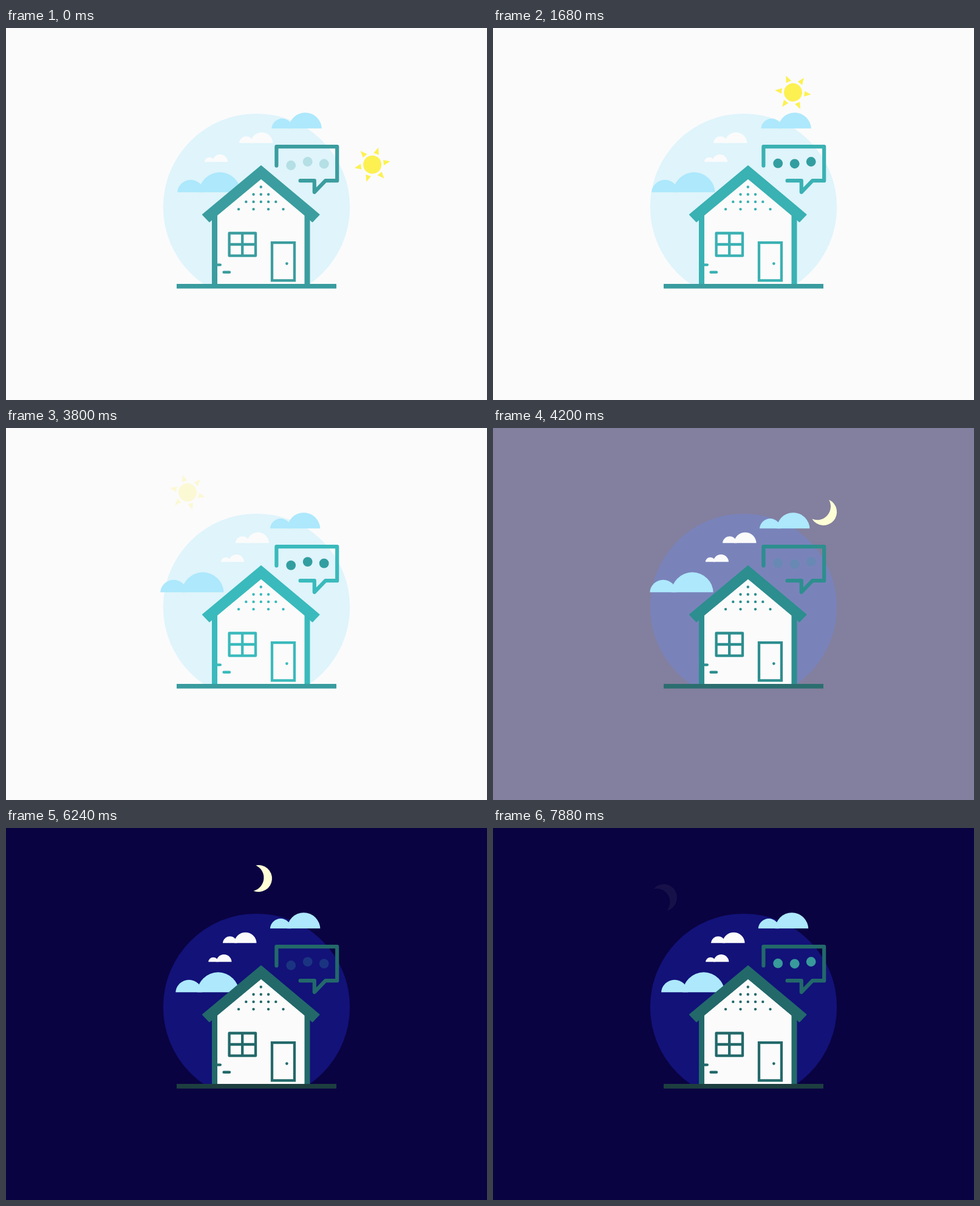
These frames come from a looping animation (792 by 612 pixels, 7920 ms). An HTML page:

```html
<!DOCTYPE html>
<html lang="en">
<head>
<meta charset="utf-8">
<title>House by day and night</title>
<style>
  html, body { margin: 0; width: 100%; height: 100%; overflow: hidden; background: #fbfbfb; }
  svg { display: block; width: 792px; height: 612px; }
  .line { fill: none; stroke: var(--house); stroke-linejoin: round; stroke-linecap: round; }
  .fill { fill: var(--house); }
</style>
</head>
<body>
<svg id="stage" viewBox="0 0 792 612">
  <defs>
    <clipPath id="aboveGround"><rect width="792" height="421"/></clipPath>
    <clipPath id="flatBase"><rect x="-5" y="-40" width="120" height="40"/></clipPath>
    <g id="cloud" clip-path="url(#flatBase)">
      <circle cx="22" cy="1.5" r="22.05"/>
      <circle cx="70" cy="1.5" r="34.5"/>
    </g>
  </defs>

  <rect id="sky" width="792" height="612"/>
  <circle id="disc" cx="412.5" cy="294.6" r="153.7" clip-path="url(#aboveGround)"/>
  <g id="sun" fill="#fcf151"><circle r="15"/></g>
  <path id="moon" fill="#ffffd6" d="M-6.5-21A22 22 0 1 1-6.5 21A22.2 22.2 0 0 0-6.5-21Z"/>
  <g id="clouds"></g>

  <path class="fill" d="M339 300H500.5V421H339Z"/>
  <path fill="#fbfbfb" d="M348 421V308L420 248L491.5 308V421Z"/>
  <path class="fill" stroke="var(--house)" stroke-width="2" stroke-linejoin="round"
        d="M420 227L515.5 307L504.5 318.5L492.5 308.1L420 247.4L347 308.1L335 318.5L324 307Z"/>
  <g id="gable" class="fill"></g>
  <path class="line" stroke-width="4.3" d="M367.6 337.5H411V374.7H367.6ZM389.2 337.5V374.7M367.6 356H411"/>
  <path class="line" stroke-width="4.3" style="stroke-linejoin:miter" d="M438 353.2H475V415.3H438Z"/>
  <circle class="fill" cx="462.4" cy="387.6" r="2.3"/>
  <path class="line" stroke-width="4.4" d="M346 389.6H352.8M358.6 401.8H368"/>
  <rect id="ground" x="281" y="421" width="263" height="7.6"/>
  <path class="line" stroke-width="6.2" d="M445.4 226.4V195.2H545.2V251.2H526L507.8 270V251.2H484.6"/>
  <g id="typing"></g>
</svg>

<script>
const LOOP = 7920, HALF = LOOP / 2, FADE = 720;
const PIVOT = [396.5, 305];
const DRIFT = .0103; // cloud speed, px per ms
const $ = id => document.getElementById(id);

function add(parent, tag, attrs) {
  const el = document.createElementNS('http://www.w3.org/2000/svg', tag);
  for (const k in attrs) el.setAttribute(k, attrs[k]);
  return parent.appendChild(el);
}
const clamp = v => Math.min(1, Math.max(0, v));

function mix(a, b, k) {
  const part = (c, i) => parseInt(c.slice(i, i + 2), 16);
  return `rgb(${[1, 3, 5].map(i => Math.round(part(a, i) + (part(b, i) - part(a, i)) * k))})`;
}

// Clouds drift at one speed and reverse at each turning time
const clouds = [
  { x: 278, y: 270.3, size: 1, dir: -1, fill: '#ade8fc', turns: [3060, 6950] },
  { x: 441.5, y: 165.3, size: .79, dir: 1, fill: '#ade8fc', turns: [815, 3037, 5020, 6970] },
  { x: 379.8, y: 189.2, size: .532, dir: -1, fill: '#fbfbfb', turns: [2004, 4017, 6960] },
  { x: 331, y: 220.2, size: .366, dir: 1, fill: '#fbfbfb', turns: [3010, 6020] }
];
for (const c of clouds) c.el = add($('clouds'), 'use', { href: '#cloud', fill: c.fill });

function cloudX({ x, dir, turns }, t) {
  let way = t, sign = -2;
  for (const turn of turns) {
    way += sign * Math.max(0, t - turn);
    sign = -sign;
  }
  return x + dir * DRIFT * way;
}

for (let i = 0; i < 6; i++)
  add($('sun'), 'path', { d: 'M29.8-.6L18.8-4.6L18.8 4.4Z', transform: `rotate(${i * 60 - 18.3})` });

[[0], [-1, 0, 1], [-2, -1, 0, 1, 2], [-3, -1, 1, 3]].forEach((row, r) => {
  for (const c of row)
    add($('gable'), 'circle', { cx: 419.8 + c * 12.25, cy: 261.5 + r * 12.2, r: 2.2 });
});

const dots = [469.2, 496.7, 523.7].map(cx => add($('typing'), 'circle', { cx, r: 7.9 }));
const dotPhase = [0, 180, 80];

function orbit(el, angle, radius, opacity) {
  el.setAttribute('transform', `translate(${PIVOT}) rotate(${angle}) translate(0 ${-radius})`);
  el.setAttribute('opacity', opacity);
}

function draw(t) {
  const night = clamp((t - 4000) / 400);
  const dusk = clamp((t - HALF) / 440);
  const day = mix('#3b9d9f', '#3ababc', clamp(t / 2400));
  $('stage').style.setProperty('--house', dusk ? mix('#3ababc', '#23696a', dusk) : day);
  $('sky').setAttribute('fill', mix('#fbfbfb', '#0a0341', night));
  $('disc').setAttribute('fill', mix('#dff4fb', '#121279', night));
  $('ground').setAttribute('fill', mix('#399c9e', '#1d3f40', night));

  const u = t - 4000;
  orbit($('sun'), 68.8 - .025768 * t + 2.09e-7 * t * t, 221.7, clamp((HALF - t) / FADE));
  orbit($('moon'), 44.55 - .01509 * u - 1.145e-6 * u * u, 222.8,
        t < HALF ? 0 : clamp((LOOP - t) / FADE));

  // Clouds set off a little faster, then settle to their steady speed
  const wind = t - 400 * Math.exp(-t / 700);
  for (const c of clouds)
    c.el.setAttribute('transform', `translate(${cloudX(c, wind)} ${c.y}) scale(${c.size})`);

  const lit = Math.floor(t % 1980 / 495);
  const p = t % 1240 / 1240;
  const swing = 360 * (p - .1 * Math.sin(Math.PI * p));
  dots.forEach((dot, i) => {
    dot.setAttribute('cy', 223 + 3 * Math.cos((swing + dotPhase[i]) * Math.PI / 180));
    dot.setAttribute('fill', mix('#339ea0', '#389a9b', night));
    dot.setAttribute('opacity', i < lit ? 1 : .25);
  });
}

const start = performance.now();
function tick() {
  const t = (performance.now() - start) % LOOP;
  draw(Math.floor(t / 40) * 40);
  requestAnimationFrame(tick);
}
tick();
</script>
</body>
</html>
```
